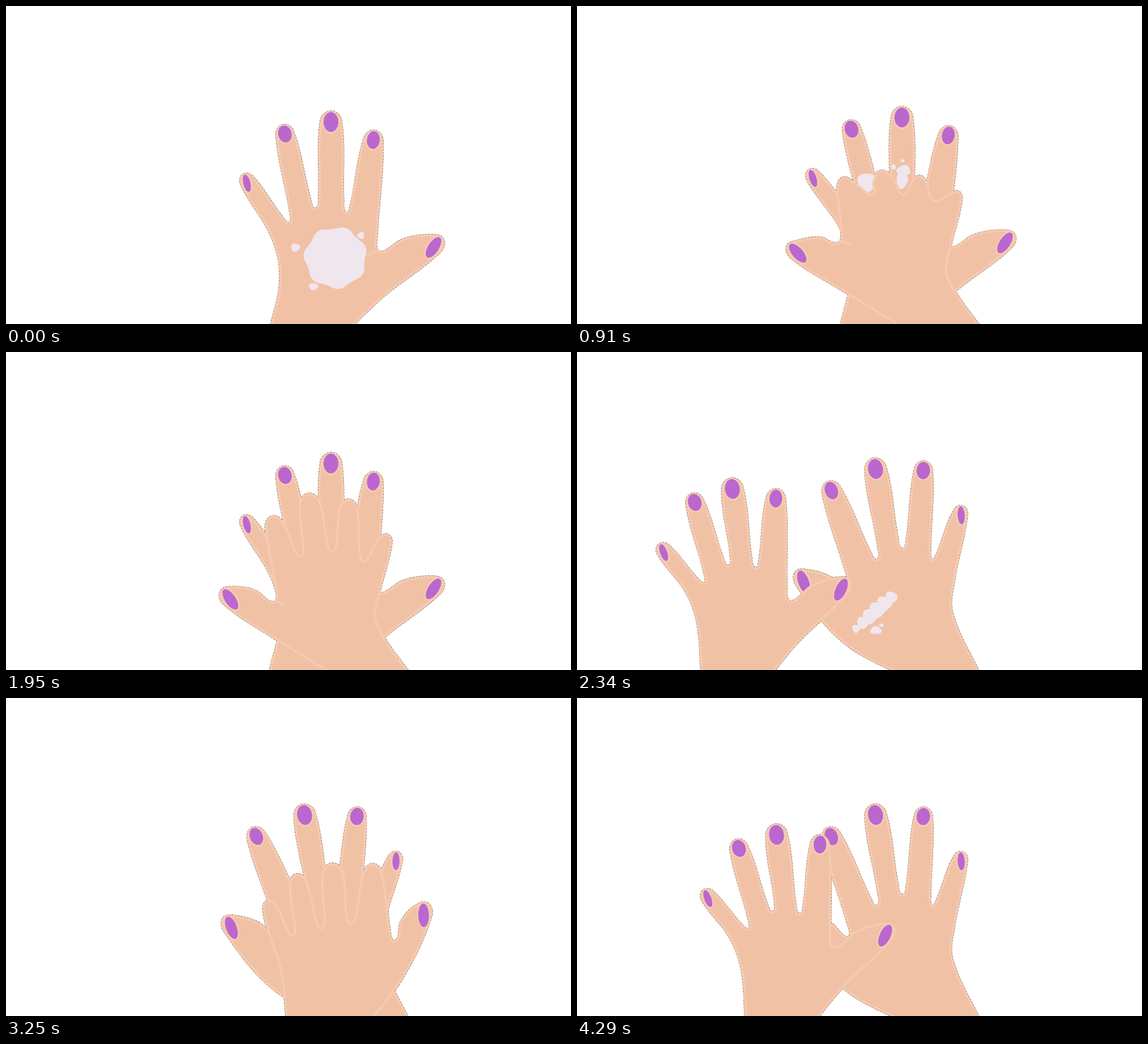
Recreate the animation shown at these times as an HTML page with a canvas. Size 998 by 561 pixels, loop 4.42 s.

```html
<!DOCTYPE html>
<html lang="en">
<head>
<meta charset="utf-8">
<title>Washing hands</title>
<style>
html, body { margin: 0; width: 100%; height: 100%; overflow: hidden; background: #fff; }
canvas { display: block; width: 998px; height: 561px; }
</style>
</head>
<body>
<canvas id="stage" width="998" height="561"></canvas>
<script>
const ctx = document.getElementById('stage').getContext('2d');
const STEP = 130, STEPS = 34;
const SKIN = '#f0c1a5', RIM = '#f5cab0', NAIL = '#ba67cf', FOAM = '#f0e6ee', EDGE = '#7a5b48';

// Pinky to thumb: radius, nail width and length (in radii), nail turn and sideways shift.
const FINGERS = [
  { r: 13, wide: 0.48, long: 1.2, turn: 0.35, shift: -0.2 },
  { r: 16, wide: 0.74, long: 0.95, turn: 0, shift: 0 },
  { r: 19, wide: 0.69, long: 0.92, turn: 0, shift: 0 },
  { r: 17, wide: 0.66, long: 0.92, turn: 0, shift: 0 },
  { r: 18, wide: 0.52, long: 1.15, turn: -0.5, shift: 0.25 }
];
const THUMB = 4, THUMB_WEB = 3;

const pts = s => s.trim().split(/\s+/).map(p => p.split(',').map(Number));
const add = (a, b, k = 1) => [a[0] + b[0] * k, a[1] + b[1] * k];
const sub = (a, b) => add(a, b, -1);
const mix = (a, b, t) => add(a, sub(b, a), t);
const unit = v => { const l = Math.hypot(...v) || 1; return [v[0] / l, v[1] / l]; };

// A pose: fingertips and webs from pinky to thumb, then the arm
// (palm edge, wrist, outer end, thumb base, inner end).
const pose = (tips, webs, arm) => ({ tips: pts(tips), webs: pts(webs), arm: pts(arm) });

const leftBack = pose('418,297 489,209 574,185 651,219 773,411',
  '501,381 547,356 601,364 657,430', '470,412 483,484 463,578 670,511 600,577');
const rightBack = pose('681,271 613,192 524,187 443,228 386,387',
  '627,366 575,346 530,365 481,419', '668,400 664,460 718,578 470,513 585,577');
const rightFlat = pose('674,321 605,259 534,249 470,289 378,422',
  '630,367 576,350 521,359 476,438', '660,430 656,478 724,580 470,504 580,572');
const leftOpen = pose('222,339 281,249 350,222 430,241 560,402',
  '303,406 346,376 393,380 452,437', '270,425 290,482 297,580 468,514 414,580');
const leftFlat = pose('461,357 513,310 576,291 648,292 744,361',
  '507,417 557,404 609,396 684,427', '466,425 484,480 496,578 703,492 640,578');

// Curling squeezes fingers toward a sloping knuckle line.
const rightCurl = { x: 560, y: 318, slope: 0.1, squeeze: 0.62, thumb: [-8, 2], web: [-12, -24] };
const leftCurl = { x: 555, y: 345, slope: -0.25, squeeze: 0.55, thumb: [23, 22], web: [4, 0] };

function blend(a, b, t) {
  const each = key => a[key].map((p, i) => mix(p, b[key][i], t));
  return { tips: each('tips'), webs: each('webs'), arm: each('arm') };
}

function curl(p, c, t) {
  const squeeze = ([x, y]) => [x, y + (c.y + (x - c.x) * c.slope - y) * c.squeeze * t];
  return {
    tips: p.tips.map((q, i) => i === THUMB ? add(q, c.thumb, t) : squeeze(q)),
    webs: p.webs.map((q, i) => i === THUMB_WEB ? add(q, c.web, t) : squeeze(q)),
    arm: p.arm
  };
}

// Fans the fingers out from the middle one, more toward the top.
function spread(p, t) {
  const cx = p.tips[2][0];
  const fan = ([x, y]) => [x + (x - cx) * 0.1 * t * Math.min(1, Math.max(0, (420 - y) / 200)), y];
  return { tips: p.tips.map(fan), webs: p.webs.map(fan), arm: p.arm };
}

function shift(p, dx, dy = 0) {
  const move = list => list.map(q => add(q, [dx, dy]));
  return { tips: move(p.tips), webs: move(p.webs), arm: move(p.arm) };
}

// Value per step, linear between keys given as [step, value].
function track(k, ...keys) {
  let i = 0;
  while (i < keys.length - 2 && k >= keys[i + 1][0]) i++;
  const [a, u] = keys[i], [b, v] = keys[i + 1];
  return u + (v - u) * Math.min(1, Math.max(0, (k - a) / (b - a)));
}

// Smooth closed curve; a doubled point makes a corner.
function curve(list) {
  const n = list.length, path = new Path2D();
  const at = i => list[(i + n) % n];
  const dir = i => unit(sub(at(i + 1), at(i - 1)));
  path.moveTo(...list[0]);
  for (let i = 0; i < n; i++) {
    const a = at(i), b = at(i + 1), h = Math.hypot(...sub(b, a)) * 0.36;
    path.bezierCurveTo(...add(a, dir(i), h), ...add(b, dir(i + 1), -h), ...b);
  }
  path.closePath();
  return path;
}

// Builds the outline and nails; side is 1 for a left hand, -1 for a right one.
function build(p, side, crease) {
  const [palm, wrist, end, base, tail] = p.arm;
  const fingers = FINGERS.map((f, i) => {
    const tip = p.tips[i], root = mix(p.webs[i - 1] || palm, p.webs[i] || base, 0.5);
    const u = unit(sub(tip, root)), n = [-u[1] * side, u[0] * side];
    const joint = add(tip, u, -f.r * 0.9);
    return { ...f, tip, u, n, near: add(joint, n, -f.r), far: add(joint, n, f.r) };
  });
  const line = [end, end, wrist, palm];
  fingers.forEach((f, i) => {
    if (i === THUMB) line.push(add(mix(p.webs[THUMB_WEB], f.near, 0.5), f.n, -f.r * 0.35));
    line.push(f.near, f.tip, f.far);
    if (i === THUMB) return;
    const web = p.webs[i], next = fingers[i + 1].near, across = unit(sub(next, f.far));
    line.push(add(mix(web, f.far, 0.12), across, -4), web, add(mix(web, next, 0.12), across, 4));
  });
  line.push(base, tail, tail);
  const nails = fingers.map(f => {
    const c = add(add(f.tip, f.u, -f.r * (f.long + 0.12)), f.n, f.shift * f.r);
    const nail = new Path2D();
    nail.ellipse(...c, f.r * f.long, f.r * f.wide, Math.atan2(f.u[1], f.u[0]) + f.turn * side, 0, Math.PI * 2);
    return nail;
  });
  const fold = crease && [p.webs[THUMB_WEB], add(p.webs[THUMB_WEB], fingers[THUMB].u, -20)];
  return { path: curve(line), nails, fold };
}

function drawEdge(hand) {
  ctx.strokeStyle = EDGE;
  ctx.lineWidth = 1.5;
  ctx.setLineDash([4, 1.5]);
  ctx.stroke(hand.path);
  ctx.setLineDash([]);
}

function drawHand(hand) {
  ctx.save();
  ctx.clip(hand.path);
  ctx.fillStyle = SKIN;
  ctx.fillRect(0, 0, 998, 561);
  ctx.strokeStyle = RIM;
  ctx.lineWidth = 8;
  ctx.stroke(hand.path);
  if (hand.fold) {
    ctx.lineWidth = 4;
    ctx.lineCap = 'round';
    ctx.beginPath();
    ctx.moveTo(...hand.fold[0]);
    ctx.lineTo(...hand.fold[1]);
    ctx.stroke();
  }
  ctx.lineWidth = 6;
  ctx.fillStyle = NAIL;
  for (const nail of hand.nails) {
    ctx.stroke(nail);
    ctx.fill(nail);
  }
  ctx.restore();
}

function bubble(x, y, rx, ry = rx, lobes = 3, depth = 0.1) {
  const n = lobes * 4;
  const ring = Array.from({ length: n }, (_, i) => {
    const a = i / n * Math.PI * 2, r = 1 + depth * Math.sin(a * lobes + x);
    return [x + rx * r * Math.cos(a), y + ry * r * Math.sin(a)];
  });
  ctx.fillStyle = FOAM;
  ctx.fill(curve(ring));
}

function foam(k) {
  if (k < 6) {
    bubble(582, 444, 54, 53, 7, 0.05);
    bubble(627, 405, 6);
    bubble(511, 426, 8, 7);
    bubble(543, 495, 8, 6);
  }
  if (k > 4 && k < 11) {
    bubble(512, 311, 16, 17);
    bubble(577, 290, 12, 9);
    bubble(574, 308, 10, 14);
    bubble(559, 284, 4.5);
    bubble(575, 273, 3.5, 2.5);
  }
  if (k > 17 && k < 25) {
    for (let i = 0; i <= 5; i++) {
      bubble(...mix([555, 433], [493, 488], i / 5), 7 + 7 * Math.sin((i + 1) / 6 * Math.PI));
    }
    bubble(528, 491, 10, 7);
    bubble(538, 482, 4, 3);
  }
}

// Hands from back to front.
function scene(k) {
  if (k < 18) {
    const bend = track(k, [5, 0], [7, 1], [10, 0], [12, 0.4], [15, 0]);
    const slide = track(k, [15, 0], [16, -60], [17, -170]);
    const lift = track(k, [0, 0], [4, -8]);
    const hands = [build(shift(spread(leftBack, bend), slide, lift), 1, true)];
    if (k > 0) {
      const away = track(k, [1, 1], [4, 0]);
      hands.push(build(shift(curl(rightFlat, rightCurl, bend), 78 * away, 330 * away), -1, true));
    }
    return hands;
  }
  const flat = track(k, [20, 0], [22, 0.7], [24, 1], [31, 1], [33, 0]);
  const bend = track(k, [25, 0], [30, 1], [31, 0]);
  const dx = track(k, [18, -78], [20, 0], [25, 0], [27, 104], [30, 0]);
  const fan = track(k, [20, 0], [25, 1], [30, 0]);
  const front = curl(blend(leftOpen, leftFlat, flat), leftCurl, bend);
  return [build(spread(rightBack, fan), -1), build(shift(front, dx), 1)];
}

let shown = -1;
function tick() {
  const k = Math.floor(performance.now() / STEP) % STEPS;
  if (k !== shown) {
    shown = k;
    ctx.fillStyle = '#fff';
    ctx.fillRect(0, 0, 998, 561);
    const [back, front] = scene(k);
    drawEdge(back);
    if (front) drawEdge(front);
    // Fingernails of a palm-down front hand stay hidden while its fingers interlock.
    if (front && (k < 18 || (k > 21 && k < 32))) front.nails.splice(0, THUMB);
    drawHand(back);
    foam(k);
    if (front) drawHand(front);
  }
  requestAnimationFrame(tick);
}
tick();
</script>
</body>
</html>
```
